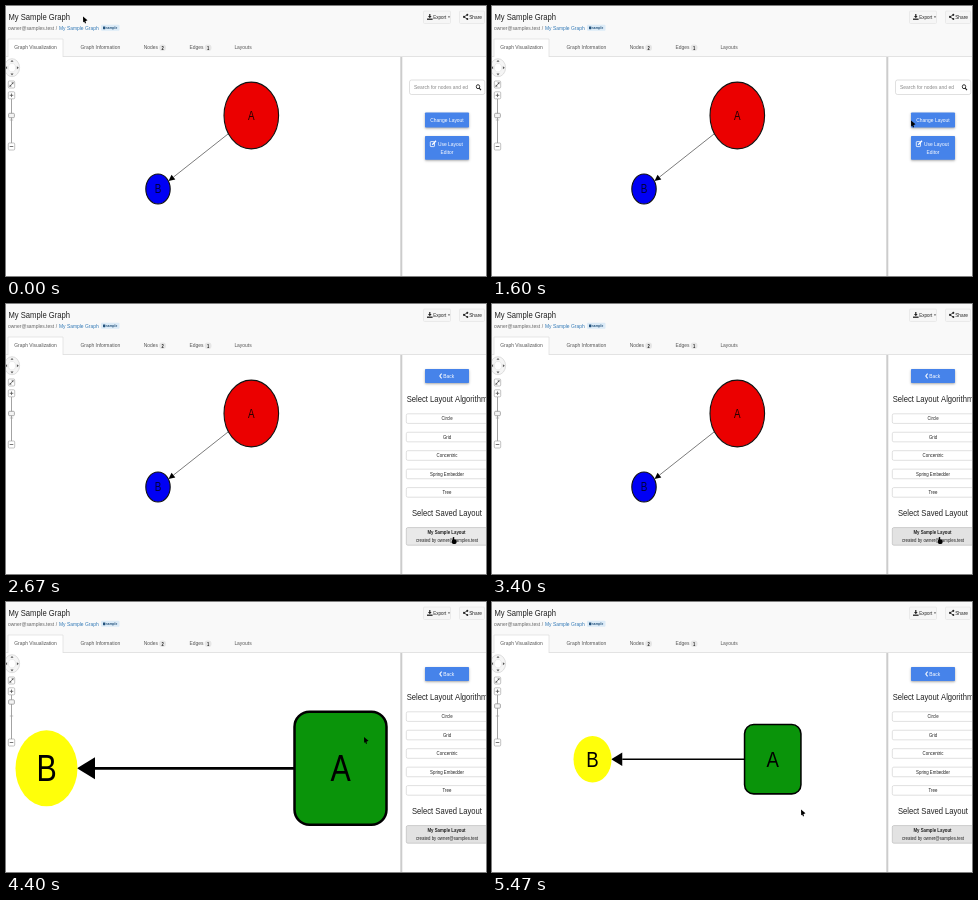
Animation, 480 px wide and 270 px high, one loop 5990 ms. Source, as an HTML page with a canvas:

```html
<!DOCTYPE html>
<html lang="en">
<head>
<meta charset="utf-8">
<title>Graph layouts</title>
<style>
html, body { margin: 0; width: 100%; height: 100%; overflow: hidden; background: #fff; }
canvas { display: block; width: 480px; height: 270px; }
</style>
</head>
<body>
<canvas id="stage"></canvas>
<script>
const LOOP = 5990, FPS = 15;
const SQUASH = 0.82; // the whole screen is narrowed by this factor
const INK = '#222', GREY = '#555', BLUE = '#4683ea', LINK = '#337ab7';
const OWNER = 'owner@samples.test';
const UP = -Math.PI / 2, DOWN = Math.PI / 2;

const canvas = document.getElementById('stage');
const ctx = canvas.getContext('2d');
const dpr = window.devicePixelRatio || 1;
canvas.width = 480 * dpr;
canvas.height = 270 * dpr;

// Places the pointer visits
const title = [77, 10.5], nodeA = [245, 112], nodeB = [154, 186];
const firstTab = [48, 40], lastTab = [235, 41], change = [419, 114.5];
const belowTree = [443.5, 196], saved = [447.5, 233];
const middle = [225, 156.5], bigB = [38, 166], bigA = [358, 135];
const rest = [195.5, 144], end = [309, 207.5];

const ROUTE = [
  [0, title], [270, nodeA], [470, nodeB], [800, firstTab], [1130, lastTab],
  [1330, nodeB], [1600, change], [1930, [441, 115]], [2130, belowTree],
  [2500, saved], [3470, saved], [3860, middle], [4130, bigB], [4400, bigA],
  [4590, rest], [5000, rest], [5460, end]
];

function pointerAt(t) {
  const i = ROUTE.findIndex(([time]) => time > t);
  if (i < 0) return end;
  const [t0, from] = ROUTE[i - 1], [t1, to] = ROUTE[i];
  const u = (t - t0) / (t1 - t0), k = u * u * (3 - 2 * u);
  return from.map((v, j) => v + (to[j] - v) * k);
}

function text(str, x, y, size, color = GREY, align = 'left', weight = '') {
  ctx.save();
  ctx.translate(x, y);
  ctx.scale(SQUASH, 1);
  ctx.font = `${weight} ${size}px "Liberation Sans", Arial, sans-serif`;
  ctx.textAlign = align;
  ctx.fillStyle = color;
  ctx.fillText(str, 0, 0);
  ctx.restore();
}

function paint(fill, stroke, width = 0.6) {
  if (fill) { ctx.fillStyle = fill; ctx.fill(); }
  if (stroke) { ctx.strokeStyle = stroke; ctx.lineWidth = width; ctx.stroke(); }
}

function rect(x, y, w, h, fill, stroke, r = 0, width) {
  ctx.beginPath();
  ctx.roundRect(x, y, w, h, r);
  paint(fill, stroke, width);
}

function ellipse(x, y, rx, ry, fill, stroke, width) {
  ctx.beginPath();
  ctx.ellipse(x, y, rx, ry, 0, 0, 7);
  paint(fill, stroke, width);
}

function line(x1, y1, x2, y2, color, width) {
  ctx.beginPath();
  ctx.moveTo(x1, y1);
  ctx.lineTo(x2, y2);
  paint(null, color, width);
}

// Triangle with its tip at x, y
function head(x, y, angle, length, half, color) {
  ctx.save();
  ctx.translate(x, y);
  ctx.rotate(angle);
  ctx.beginPath();
  ctx.moveTo(0, 0);
  ctx.lineTo(-length, half);
  ctx.lineTo(-length, -half);
  paint(color);
  ctx.restore();
}

function edge(x1, y1, x2, y2, color, width, length, half) {
  const angle = Math.atan2(y2 - y1, x2 - x1);
  line(x1, y1, x2 - length * Math.cos(angle), y2 - length * Math.sin(angle), color, width);
  head(x2, y2, angle, length, half, '#000');
}

function plus(x, y, r) {
  line(x - r, y, x + r, y, GREY, 0.8);
  line(x, y - r, x, y + r, GREY, 0.8);
}

function blueButton(y, h) {
  ctx.save();
  ctx.shadowColor = 'rgba(0,0,0,.35)';
  ctx.shadowBlur = 2.5 * dpr;
  ctx.shadowOffsetY = dpr;
  rect(419, y, 44, h, BLUE, null, 0.8);
  ctx.restore();
}

function tab(name, x, count) {
  text(name, x, 43.2, 6, GREY, count ? 'right' : 'center');
  if (!count) return;
  rect(x + 1.2, 38.6, 6.8, 6.4, '#e6e6e6', null, 3);
  text(count, x + 4.6, 43.7, 5, INK, 'center', 'bold');
}

function header() {
  rect(0, 0, 480, 50.5, '#f9f9f9');
  text('My Sample Graph', 2.5, 14.1, 9.3, INK);
  text(OWNER, 2, 23.6, 6, '#666');
  text('/', 49.7, 23.6, 6, '#666');
  text('My Sample Graph', 53, 23.6, 6, LINK);
  rect(95, 18.8, 18.5, 6, '#dcebf7', null, 1);
  rect(97, 20.4, 2.4, 2.8, '#23527c', null, 0.4);
  text('sample', 100, 23.3, 4, '#23527c', 'left', 'bold');

  rect(417.5, 5, 27, 12.5, '#f6f6f6', '#ddd', 1, 0.5);
  line(423.8, 8, 423.8, 11, INK, 1.2);
  head(423.8, 12.3, DOWN, 2.2, 1.8, INK);
  line(421, 13.2, 426.6, 13.2, INK, 1.3);
  text('Export', 427.2, 12.8, 5.5, INK);
  head(443, 11.8, DOWN, 1.4, 1.1, INK);

  rect(453.5, 5, 25, 12.5, '#f6f6f6', '#ddd', 1, 0.5);
  ellipse(458, 10.9, 1, 1.1, INK);
  for (const y of [8.8, 13]) {
    line(458, 10.9, 461.3, y, INK, 0.8);
    ellipse(461.3, y, 1, 1.1, INK);
  }
  text('Share', 463.2, 12.8, 5.8, INK);

  line(0, 50.5, 480, 50.5, '#ddd', 0.8);
  rect(2, 33, 55, 20, '#fff', '#ddd', 0, 0.7);
  rect(0, 50.9, 480, 4, '#fff');
  tab('Graph Visualization', 29.5);
  tab('Graph Information', 94.3);
  tab('Nodes', 152, '2');
  tab('Edges', 197.5, '1');
  tab('Layouts', 237);
}

function controls(knobY) {
  ellipse(6, 61.7, 7.6, 9, '#f5f5f5', '#ccc', 0.6);
  ellipse(6, 61.7, 3.5, 4.2, '#fff', '#ddd', 0.5);
  for (let a = 0; a < 4; a++) {
    const angle = a * DOWN;
    head(6 + 6.8 * Math.cos(angle), 61.7 + 7.8 * Math.sin(angle), angle, 1.9, 1.5, GREY);
  }
  for (const y of [75, 85.8, 137]) rect(2.3, y, 6.4, 7, '#fff', '#aaa', 1, 0.7);
  line(3.8, 80.5, 7.2, 76.6, GREY, 0.7);
  head(7.6, 76.2, UP / 2, 2, 1.3, GREY);
  head(3.4, 80.8, UP / 2 + Math.PI, 2, 1.3, GREY);
  plus(5.5, 89.3, 1.8);
  line(3.7, 140.5, 7.3, 140.5, GREY, 0.8);
  line(5.5, 93, 5.5, 137, '#999', 0.9);
  line(3.8, 114, 7.2, 114, '#999', 0.6);
  rect(2.6, knobY - 2.2, 5.8, 4.4, '#f4f4f4', '#888', 1, 0.7);
}

function firstGraph() {
  edge(222, 128, 162.5, 175, '#444', 0.7, 6.3, 3);
  ellipse(245.3, 109.5, 27.3, 33.4, '#eb0000', '#111', 1.1);
  text('A', 245.3, 113.5, 12, '#200', 'center');
  ellipse(152, 183, 12.2, 15, '#0000f5', '#111', 1.1);
  text('B', 152, 187, 12, '#00003c', 'center');
}

function savedGraph(scale, dx, dy) {
  ctx.save();
  ctx.translate(dx, dy);
  ctx.scale(scale, scale);
  edge(288, 166.3, 71, 166.3, '#000', 2.7, 18, 11);
  ellipse(40.5, 166.3, 31, 38, '#ffff0a');
  text('B', 40.5, 178.9, 37, '#000', 'center');
  rect(288.5, 109.8, 92, 113, '#0a940a', '#000', 15, 2.5);
  text('A', 334.5, 178.9, 37, '#000', 'center');
  ctx.restore();
}

function homePanel() {
  rect(403.5, 74, 75.3, 14.5, '#fff', '#ccc', 2, 0.6);
  text('Search for nodes and ed', 408, 83.2, 6, '#888');
  ellipse(472, 80.7, 1.7, 2, null, INK, 0.9);
  line(473.2, 82.2, 475, 84.2, INK, 1.1);
  blueButton(106.5, 15);
  text('Change Layout', 441, 116, 6, '#fff', 'center');
  blueButton(130, 23.7);
  rect(424.3, 135.6, 4.2, 5, null, '#fff', 0.7, 0.8);
  line(426.2, 138.8, 430, 134.8, '#fff', 1.3);
  text('Use Layout', 432, 139.8, 6, '#fff');
  text('Editor', 441, 148.4, 6, '#fff', 'center');
}

function layoutPanel(t) {
  blueButton(65, 14);
  for (const y of [69.7, 74.3]) line(435.6, y, 433.7, 72, '#fff', 1.1);
  text('Back', 437.2, 74.2, 6, '#fff');
  text('Select Layout Algorithm', 441, 98, 9.3, INK, 'center');
  const hot = t > 2040 && t < 2190 ? 'Spring Embedder' : '';
  ['Circle', 'Grid', 'Concentric', 'Spring Embedder', 'Tree'].forEach((name, i) => {
    const y = 114.6 + i * 18.45;
    const on = name === hot;
    rect(400.3, y - 4.8, 81, 9.6, on ? '#e6e6e6' : '#fff', on ? '#aaa' : '#ccc', 1.5);
    text(name, 441, y + 1.8, 5.3, INK, 'center');
  });
  text('Select Saved Layout', 441, 212, 9.3, INK, 'center');
  const hover = Math.min(1, Math.max(0, (t - 2440) / 300));
  const tone = 255 - 29 * hover;
  rect(400.3, 223.6, 81, 17.6, `rgb(${tone},${tone},${tone})`, hover ? '#b5b5b5' : '#ccc', 1.5);
  text('My Sample Layout', 440.5, 230.2, 5.3, INK, 'center', 'bold');
  text('created by ' + OWNER, 441, 238.1, 5.3, INK, 'center');
}

function statusBar() {
  rect(-2, 262, 162.5, 10, '#e6e6e6', '#ccc', 1);
  text('graphspace.org/graphs/21733#change_layout', -2, 268.9, 6, '#888');
}

function pointer([x, y], hand) {
  if (hand) {
    rect(x - 0.6, y, 1.3, 4, '#000', null, 0.6);
    rect(x - 1.6, y + 2.5, 4.6, 4.4, '#000', null, 1.4);
  } else {
    head(x, y, -2.03, 5.3, 2.4, '#000');
    line(x + 1.2, y + 3, x + 2.5, y + 6.7, '#000', 1.1);
  }
}

function draw(now) {
  const t = Math.floor((now % LOOP + 4) * FPS / 1000) * 1000 / FPS;
  const loaded = t > 3520, zoomedOut = t > 4590;
  ctx.setTransform(dpr, 0, 0, dpr, 0, 0);
  rect(0, 0, 480, 270, '#fff');
  header();
  if (!loaded) firstGraph();
  else if (zoomedOut) savedGraph(0.613, 75.7, 55.3);
  else savedGraph(1, 0, 0);
  controls(!loaded ? 109.5 : zoomedOut ? 104 : 100);
  rect(394.3, 51, 2, 219, '#ccc');
  if (t < 1990) homePanel();
  else layoutPanel(t);
  if (t > 1860 && t < 2460) statusBar();
  pointer(pointerAt(t), t > 1660 && t < 3530);
}

function tick() {
  draw(performance.now());
  requestAnimationFrame(tick);
}
tick();
</script>
</body>
</html>
```
